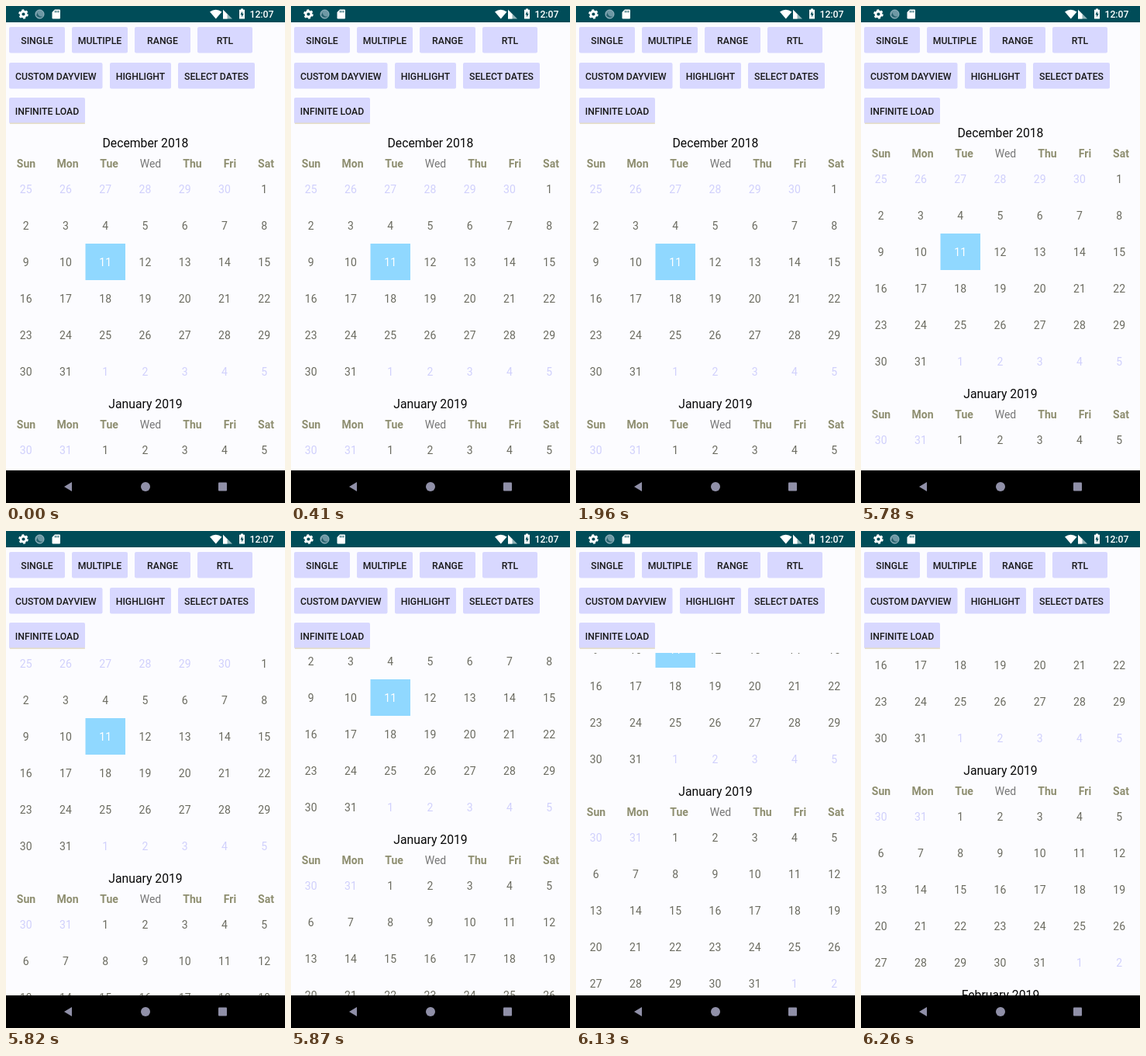
An HTML page that plays this animation: 360x640 px, repeating every 8000 ms.

```html
<!DOCTYPE html>
<html lang="en">
<head>
<meta charset="utf-8">
<title>Calendar list</title>
<style>
  html, body { margin: 0; width: 100%; height: 100%; overflow: hidden; background: #fcfcff; }
  svg { display: block; width: 360px; height: 640px; }
  text { font-family: Roboto, sans-serif; text-anchor: middle; }
  .button { fill: #d8d8ff; }
  .label { font-size: 12.25px; font-weight: 500; fill: #1a1a1a; }
  .title { font-size: 15.75px; fill: #080808; }
  .weekday { font-size: 14px; font-weight: 700; fill: #8e8e70; }
  .weekday.plain { font-weight: 400; fill: #777; }
  .day { font-size: 14px; fill: #6b6b60; }
  .day.outside { fill: #d0d0fc; }
  .day.selected { fill: #fff; }
  .clock { font-size: 12.25px; font-weight: 500; fill: #fff; }
  #list { animation: scroll 8s step-end infinite; }
  @keyframes scroll {
    0% { transform: translateY(0); }
    72.25% { transform: translateY(-13px); }
    72.75% { transform: translateY(-65px); }
    73.375% { transform: translateY(-115px); }
    73.875% { transform: translateY(-147px); }
    74.5% { transform: translateY(-165px); }
    76.625% { transform: translateY(-177px); }
    77.125% { transform: translateY(-190px); }
    77.75% { transform: translateY(-199px); }
    78.25%, 100% { transform: translateY(-204px); }
  }
</style>
</head>
<body>
<svg viewBox="0 0 360 640">
  <defs>
    <clipPath id="viewport"><rect y="157" width="360" height="441"/></clipPath>
  </defs>
  <rect width="360" height="640" fill="#fcfcff"/>
  <rect y="594" width="360" height="4" fill="#fff"/>
  <g clip-path="url(#viewport)"><g id="list"></g></g>
  <g id="buttons"></g>
  <rect x="5" y="150.5" width="97" height="1.2" fill="#e6dcb4"/>

  <rect width="360" height="21" fill="#004c58"/>
  <g fill="#fff">
    <circle cx="22.5" cy="10.5" r="3.5" fill="none" stroke="#fff" stroke-width="2.8"/>
    <circle cx="22.5" cy="10.5" r="5.3" fill="none" stroke="#fff" stroke-width="2" stroke-dasharray="2.8 2.75"/>
    <circle cx="43.5" cy="10.5" r="5.5" fill="#6d98a4" stroke="#a5bfca"/>
    <path d="M42 6a4.7 4.7 0 0 0 6 7a5.5 5.5 0 0 1-9-1z" fill="#28636f"/>
    <path d="M63 4.5h6q1 0 1 1v10q0 1-1 1h-8.500q-1 0-1-1v-7.500z"/>
    <path d="M63.500 6v2.500M65.700 6v2.500M67.900 6v2.500" stroke="#004c58"/>
    <path d="M263 7.500Q270.500 2 278.500 7.500L270.800 16.500z"/>
    <path d="M280 4.500v12h12z" fill="#90b4b8"/>
    <path d="M280 5v11.500h5.500v-6z"/>
    <path d="M303 3.500h3v1.300h2v11.700h-7V4.800h2z"/>
    <path d="M305 6.700l-2.700 4.500h1.800v3.300l2.700-4.700H305z" fill="#004c58"/>
  </g>
  <text class="clock" x="330" y="15">12:07</text>

  <rect y="598" width="360" height="42"/>
  <g fill="#9090a8">
    <path d="M75 619l10-6v12z"/>
    <circle cx="180" cy="619" r="6"/>
    <rect x="274" y="613.500" width="11" height="11" rx="1"/>
  </g>
</svg>
<script>
  const SVG_NS = 'http://www.w3.org/2000/svg';
  const list = document.getElementById('list');
  const buttons = document.getElementById('buttons');

  function add(parent, tag, attributes, content = '') {
    const node = document.createElementNS(SVG_NS, tag);
    for (const [key, value] of Object.entries(attributes)) node.setAttribute(key, value);
    node.textContent = content;
    parent.append(node);
  }

  function addButton(x, y, width, label) {
    add(buttons, 'rect', { class: 'button', x, y, width, height: 33.5, rx: 2 });
    add(buttons, 'text', { class: 'label', x: x + width / 2, y: y + 21.5 }, label);
  }

  addButton(4, 27, 72, 'SINGLE');
  addButton(85, 27, 72, 'MULTIPLE');
  addButton(166, 27, 72, 'RANGE');
  addButton(247, 27, 71, 'RTL');
  addButton(4, 73, 120.5, 'CUSTOM DAYVIEW');
  addButton(134, 73, 79, 'HIGHLIGHT');
  addButton(222, 73, 99, 'SELECT DATES');
  addButton(4, 118, 98, 'INFINITE LOAD');

  const weekdays = ['Sun', 'Mon', 'Tue', 'Wed', 'Thu', 'Fri', 'Sat'];
  const weekdayX = [26, 79.5, 133, 186.5, 240.5, 289, 335.5];
  const ROW = 47, COLUMN = 51.25;

  // Draws one month centred on its title line and returns the next title line.
  function addMonth(name, year, month, y) {
    add(list, 'text', { class: 'title', x: 180, y: y + 5.5 }, `${name} ${year}`);
    weekdays.forEach((weekday, i) => {
      const style = weekday === 'Wed' ? 'weekday plain' : 'weekday';
      add(list, 'text', { class: style, x: weekdayX[i], y: y + 32 }, weekday);
    });
    const lead = new Date(year, month, 1).getDay();
    const length = new Date(year, month + 1, 0).getDate();
    const rows = Math.ceil((lead + length) / 7);
    for (let cell = 0; cell < rows * 7; cell++) {
      const date = new Date(year, month, cell - lead + 1);
      const x = 25.7 + (cell % 7) * COLUMN;
      const rowY = y + 60 + Math.floor(cell / 7) * ROW;
      const inside = date.getMonth() === month;
      const selected = inside && month === 11 && date.getDate() === 11;
      if (selected) {
        add(list, 'rect', { x: 102.5, y: rowY - 24, width: 51.5, height: ROW, fill: '#90d8ff' });
      }
      const style = selected ? 'day selected' : inside ? 'day' : 'day outside';
      add(list, 'text', { class: style, x, y: rowY + 5 }, date.getDate());
    }
    return y + 54 + rows * ROW;
  }

  let y = 176;
  y = addMonth('December', 2018, 11, y);
  y = addMonth('January', 2019, 0, y);
  addMonth('February', 2019, 1, y);
</script>
</body>
</html>
```
